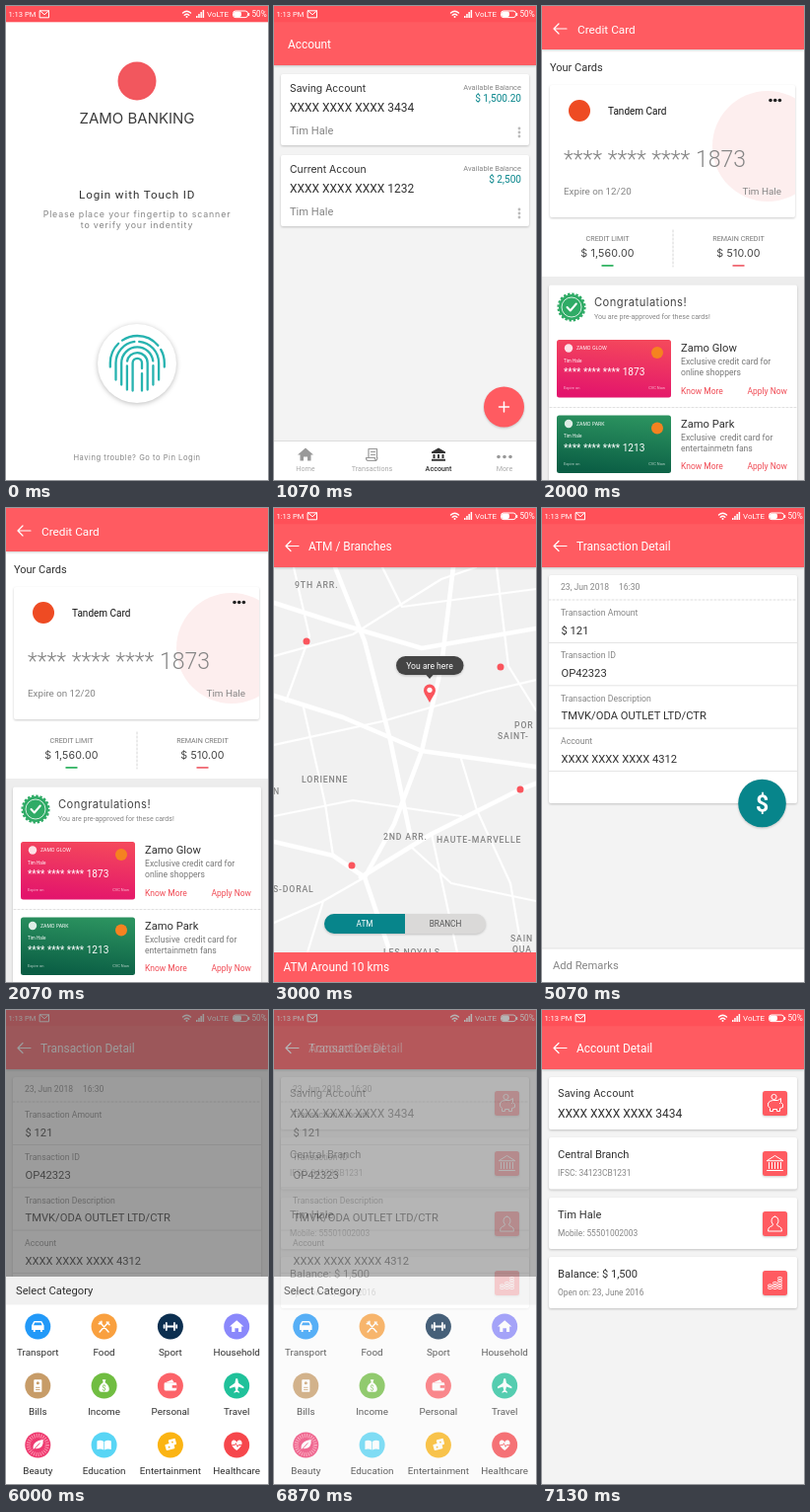
An HTML page that plays this animation: 266x480 px, repeating every 8000 ms.

```html
<!DOCTYPE html>
<html lang="en">
<head>
<meta charset="utf-8">
<title>Banking app screens</title>
<style>
html, body { margin: 0; width: 100%; height: 100%; overflow: hidden; background: #fff; }
svg { display: block; width: 100vw; height: 100vh; font-family: Roboto, sans-serif; }
text { white-space: pre; }
.wide { font-family: Inter, sans-serif; }
.lift { filter: drop-shadow(0 1px 1.3px #0003); }
.line { fill: none; stroke-linecap: round; stroke-linejoin: round; }
</style>
</head>
<body>
<svg id="stage" viewBox="0 0 266 480" preserveAspectRatio="none"></svg>
<script>
const RED = '#ff5b61', TEAL = '#07858b', INK = '#303030', GREY = '#858585', PAGE = '#f3f3f3';
const OWNER = 'Tim Hale', BANK = 'Zamo', CARD = 'Tandem Card', SHOP = 'TMVK/ODA OUTLET LTD/CTR';

const text = (x, y, size, str, fill = INK, more = '') =>
  `<text x="${x}" y="${y}" font-size="${size}" fill="${fill}" ${more}>${str}</text>`;
const rect = (x, y, w, h, fill, rx = 0, more = '') =>
  `<rect x="${x}" y="${y}" width="${w}" height="${h}" rx="${rx}" fill="${fill}" ${more}/>`;
const disc = (x, y, r, fill, more = '') => `<circle cx="${x}" cy="${y}" r="${r}" fill="${fill}" ${more}/>`;
const line = (d, stroke = '#fff', width = 1.3, more = '') =>
  `<path class="line" d="${d}" stroke="${stroke}" stroke-width="${width}" ${more}/>`;
const shape = (d, fill = '#fff', more = '') => `<path d="${d}" fill="${fill}" ${more}/>`;
const at = (x, y, body, scale = 1) => `<g transform="translate(${x} ${y}) scale(${scale})">${body}</g>`;
const MID = 'text-anchor="middle"', END = 'text-anchor="end"', WIDE = 'class="wide"', LIFT = 'class="lift"';
const spaced = gap => `letter-spacing="${gap}"`;
const panel = (x, y, w, h) => rect(x, y, w, h, '#fff', 2, LIFT);

const statusBar = () => rect(0, 0, 266, 16.3, '#ff5058') +
  text(2.5, 11.2, 7.6, '1:13 PM', '#fff') +
  line('M34.5 4.8h9v7h-9zl4.5 4 4.5-4', '#fff', 1) +
  line('M179.5 7q4-3.4 8 0M181.2 9.2q2.3-2 4.6 0', '#fff', 1.4) + disc(183.5, 11, 1, '#fff') +
  [0, 1, 2, 3].map(i => rect(193 + i * 2.2, 10 - i * 2, 1.5, 2 + i * 2, '#fff')).join('') +
  text(204, 11.2, 8, 'VoLTE', '#fff') +
  rect(230.5, 5, 15, 6.6, 'none', 2.5, 'stroke="#fff"') + rect(231, 5.5, 8, 5.6, '#fff', 2) + rect(246, 7, 1.2, 3, '#fff') +
  text(249.5, 11.2, 8.2, '50%', '#fff');

const arrow = y => line(`M25 ${y}h-13m5-5l-5 5 5 5`, '#fff', 1.2);
const header = (title, back = true) => rect(0, 0, 266, 60, RED, 0, LIFT) + statusBar() +
  (back ? arrow(38.5) : '') + text(back ? 35 : 14, 42.8, 11.9, title, '#fff');

// Small pictograms, each drawn around 0,0
const icon = {
  house: c => shape('M0-7L8 0H5.5V6H2V2h-4v4h-3.5V0H-8z', c),
  bank: c => shape('M0-7L7-3v1.5H-7V-3zM-5.5-.5h2v4h-2zm4.5 0h2v4h-2zm4.5 0h2v4h-2zM-7 4.3H7v2H-7z', c),
  receipt: c => line('M-3.5-6H5V3M-3.5-6V3M-6 3H3v1.5q2 2.5 2.5-1.5M-6 3q0 3 2 3H4M-1-3h4M-1 0h4', c, 1.2)
};

function login() {
  const arch = (r, foot, dash) =>
    line(`M${-r} ${foot}V0A${r} ${r} 0 0 1 ${r} 0V${foot}`, '#27b3b0', 2.3, `stroke-dasharray="${dash}"`);
  return rect(0, 0, 266, 480, '#fff') + statusBar() +
    disc(133, 76, 19.5, '#f2575e') +
    text(133, 118.5, 15, BANK.toUpperCase() + ' BANKING', '#3c3c3c', `${MID} ${WIDE}`) +
    text(74, 195, 11.6, 'Login with Touch ID', INK, spaced(.9)) +
    ['Please place your fingertip to scanner', 'to verify your indentity'].map((s, i) =>
      text(133, 213.5 + i * 11, 8.9, s, GREY, `${MID} ${WIDE} ${spaced(.83)}`)).join('') +
    disc(133, 362, 40, '#fff', 'style="filter:drop-shadow(0 1px 2.5px #0004)"') +
    at(133.3, 361.5,
      arch(27.5, 4, '26 5 40 5 30') + arch(21.8, 17, '48 5 80') + arch(16.1, 22, '70 5 60') +
      arch(10.4, 27, '24 5 90') + arch(4.7, 28, '48 5 40')) +
    text(133, 459.5, 7.6, 'Having trouble? Go to Pin Login', GREY, `${MID} ${WIDE} ${spaced(.52)}`);
}

function accounts() {
  const account = (y, name, no, sum) => panel(7, y, 252, 72) +
    text(16, y + 18, 10.4, name, INK, WIDE) + text(16, y + 38.3, 12, 'XXXX XXXX XXXX ' + no) +
    text(16, y + 61, 11.1, OWNER, GREY) +
    text(251, y + 15.5, 7.5, 'Available Balance', GREY, END) + text(251, y + 28, 10.1, sum, TEAL, END) +
    [55, 59, 63].map(d => disc(249, y + d, 1.4, '#bbb')).join('');
  const tab = (x, name, draw, on) => at(x, 454.5, draw) +
    text(x, 471, 7.2, name, on ? INK : '#aaa', MID + (on ? ' font-weight="500"' : ''));
  return rect(0, 0, 266, 480, PAGE) + header('Account', false) +
    account(69, 'Saving Account', '3434', '$ 1,500.20') + account(151, 'Current Accoun', '1232', '$ 2,500') +
    disc(233.5, 406, 20.5, RED, LIFT) + line('M228.5 406h10m-5-5v10', '#fff', 1.5) +
    rect(0, 440, 266, 40, '#fff') + rect(0, 440, 266, 1, '#ddd') +
    tab(32, 'Home', icon.house('#999')) + tab(99.5, 'Transactions', icon.receipt('#999')) +
    tab(167, 'Account', icon.bank('#333'), true) +
    tab(234, 'More', [-6, 0, 6].map(x => disc(x, 2, 1.8, '#999')).join(''));
}

function cards() {
  const fade = (id, top, bottom) => `<linearGradient id="${id}" x1=".6" y1="0" x2=".4" y2="1">` +
    `<stop stop-color="${top}"/><stop offset="1" stop-color="${bottom}"/></linearGradient>`;
  const limit = (x, name, sum, color) => text(x, 238.2, 7.2, name, '#777', MID) +
    text(x, 254, 10.7, sum, '#444', `${MID} ${WIDE} ${spaced(.15)}`) + rect(x - 6, 262, 12, 1.8, color);
  const offer = (y, name, no, fill, lines) => rect(15, y, 116, 58.5, fill, 2.5) +
    disc(27, y + 8.5, 4.2, '#fff', 'opacity=".85"') + disc(117, y + 13, 6, '#f58220') +
    text(35, y + 10.3, 4.9, `${BANK} ${name}`.toUpperCase(), '#fff', WIDE) +
    text(22, y + 22.5, 4.6, OWNER, '#fff') + text(22, y + 36, 10.1, '**** **** **** ' + no, '#fff') +
    text(22, y + 50, 4, 'Expire on', '#fff', 'opacity=".7"') + text(125, y + 50, 4, 'CVC Now', '#fff', END + ' opacity=".7"') +
    text(141, y + 12, 11.2, `${BANK} ${name}`) +
    lines.map((s, i) => text(141, y + 25 + i * 11, 8.6, s, '#777')).join('') +
    text(141, y + 54.5, 8.5, 'Know More', '#f04b55') + text(249, y + 54.5, 8.5, 'Apply Now', '#f04b55', END);
  return rect(0, 0, 266, 480, '#ededed') + rect(0, 44, 266, 230, '#fff') +
    rect(0, 0, 266, 44, RED, 0, LIFT) + arrow(23) + text(36, 27.5, 11.8, 'Credit Card', '#fff') +
    text(8, 66, 11, 'Your Cards') + panel(8, 80, 249, 134) +
    '<clipPath id="inCard"><path d="M8 80h249v134H8z"/></clipPath>' +
    disc(229, 142, 56, '#fdeeee', 'clip-path="url(#inCard)"') +
    disc(38, 106, 11, '#ee4b23') + text(67, 109.5, 10, CARD, '#111') +
    [232, 236.7, 241.4].map(x => disc(x, 95.5, 1.8, '#222')).join('') +
    text(22, 162.5, 23, '**** **** **** 1873', '#858585', 'font-weight="300"') +
    text(22, 191, 9.8, 'Expire on 12/20', GREY) + text(243, 191, 9.9, OWNER, GREY, END) +
    limit(66.5, 'CREDIT LIMIT', '$ 1,560.00', '#35b565') + limit(199.5, 'REMAIN CREDIT', '$ 510.00', '#f06a74') +
    line('M133 227V264', '#ccc', .8, 'stroke-dasharray="2 2"') +
    panel(7, 282.5, 252, 205) +
    disc(30, 305, 13, '#2fab66') + disc(30, 305, 13.4, 'none', 'stroke="#2fab66" stroke-width="2.4" stroke-dasharray="2.4 1.8"') +
    disc(30, 305, 10, 'none', 'stroke="#fff" stroke-width=".8"') + line('M25.5 305l3.3 3.5 6-7', '#fff', 2) +
    text(53, 304, 11.2, 'Congratulations!', '#444', `${WIDE} ${spaced(.45)}`) +
    text(53, 316.5, 7.1, 'You are pre-approved for these cards!', GREY) +
    line('M8 406.5H258', '#ddd', .9, 'stroke-dasharray="2 2"') +
    fade('pink', '#f4475c', '#e3146c') + fade('green', '#2b925f', '#0a5d44') +
    offer(338, 'Glow', '1873', 'url(#pink)', ['Exclusive credit card for', 'online shoppers']) +
    offer(414.5, 'Park', '1213', 'url(#green)', ['Exclusive  credit card for', 'entertainmetn fans']);
}

function branches() {
  const main = ['M0 190L70 212 150 246 266 262', 'M0 96L62 116 150 142 266 122', 'M62 60L92 135 118 235 138 330',
    'M88 374L160 330 250 285 266 279', 'M0 338L60 352 92 374 118 450', 'M182 60L170 160 150 246 122 320 92 374'];
  const side = ['M0 150L80 128 170 72 205 60', 'M20 60L36 130 12 196', 'M226 60L238 160 266 205', 'M0 240L110 216 215 186 266 174',
    'M30 202L52 300 60 352', 'M0 312L80 296 190 312', 'M190 254L206 306 240 380 252 450', 'M138 342L180 380 266 398',
    'M0 420L50 398 92 374M34 450L50 398', 'M160 330L186 450', 'M110 60L130 100 266 82'];
  const place = (x, y, s) => text(x, y, 8.7, s, '#858585', `font-weight="500" ${spaced(.85)}`);
  return rect(0, 0, 266, 480, '#f1f1f1') +
    main.map(d => line(d, '#fff', 4.6)).join('') + side.map(d => line(d, '#fff', 2.2)).join('') +
    [[21, 81, '9TH ARR.'], [244, 223, 'POR'], [227, 234, 'SAINT-'], [28, 277.5, 'LORIENNE'], [-1, 289.5, 'N'],
      [111, 336, '2ND ARR.'], [165, 339, 'HAUTE-MARVELLE'], [-1, 388.5, 'S-DORAL'], [111, 452.5, 'LES NOYALS'],
      [240, 438.5, 'SAIN'], [242, 450, 'QUA']].map(p => place(...p)).join('') +
    [[33, 135], [230, 161], [250, 285], [79, 362]].map(([x, y]) => disc(x, y, 3.5, '#fa555d')).join('') +
    rect(124, 150, 68.5, 19, '#454545', 9.5, LIFT) + shape('M154 168.5h8l-4 4.5z', '#454545') +
    text(158, 162.6, 8.6, 'You are here', '#fff', MID) +
    shape('M158 197C155 191 152 188 152 184.5a6 6 0 0 1 12 0C164 188 161 191 158 197z', '#fa555d') + disc(158, 184.3, 2.6, '#fff') +
    rect(51, 411, 164, 20, '#dad9d8', 10, LIFT) + shape('M133 411H61a10 10 0 0 0 0 20h72z', TEAL) +
    text(92, 424.2, 8.2, 'ATM', '#fff', MID) + text(174, 424.2, 8.2, 'BRANCH', '#555', MID) +
    header('ATM / Branches') + rect(0, 450, 266, 30, RED) + text(9.5, 469.3, 11.9, 'ATM Around 10 kms', '#fff');
}

function transactions() {
  return rect(0, 0, 266, 480, '#fff') + header('Transactions') +
    text(19, 83, 8.6, '23, Jun 2018', GREY) + text(19, 101, 11, SHOP) +
    text(247, 83, 11.2, '$ 121', INK, END) + rect(7, 112, 252, 1, '#e4e4e4');
}

function detail() {
  const rows = [['Transaction Amount', '$ 121'], ['Transaction ID', 'OP42323'],
    ['Transaction Description', SHOP], ['Account', 'XXXX XXXX XXXX 4312']];
  return rect(0, 0, 266, 480, PAGE) + header('Transaction Detail') + panel(7, 68, 252, 231) +
    text(19, 83, 8.6, '23, Jun 2018', GREY) + text(78, 83, 8.6, '16:30', GREY) +
    line('M7 93H259', '#ddd', 1, 'stroke-dasharray="2 2"') +
    rows.map(([name, value], i) => text(19, 109 + i * 43.4, 8.7, name, GREY) +
      text(19.5, 127.5 + i * 43.4, 11.2, value) + rect(7, 136 + i * 43.3, 252, 1, '#e4e4e4')).join('') +
    disc(223.5, 299, 24.3, TEAL, LIFT) + text(223.5, 307, 23, '$', '#fff', MID + ' font-weight="700"') +
    rect(0, 446, 266, 34, '#fff') + rect(0, 445.5, 266, 1, '#e2e2e2') + text(11, 467, 11.2, 'Add Remarks', GREY);
}

function sheet() {
  const heart = 'M0 6C-9 0-6-6-3-5.500Q-1-5.500 0-3Q1-5.500 3-5.500C6-6 9 0 0 6z';
  const items = [
    ['Transport', '#2299f8', shape('M-7-1l2-4q.5-1 1.500-1h7q1 0 1.500 1l2 4v5H5v2H3V4h-6v2h-2V4h-2zM-4.800-1.500h9.600l-1.300-3h-7z', '#fff', 'fill-rule="evenodd"')],
    ['Food', '#f9a03f', line('M-5-5L5 6M5-5L-5 6M-6-3l3 0 0-3M3-5l3 3', '#fff', 1.6)],
    ['Sport', '#0c2f50', line('M-7-1.500v3M-4.500-4v8M4.500-4v8M7-1.500v3M-4 0h8', '#fff', 2)],
    ['Household', '#8a88fb', icon.house('#fff')],
    ['Bills', '#c79c68', rect(-4.5, -7, 9, 14, '#fff', 1) + disc(0, -3, 1.7, '#c79c68') + line('M-2 2h4M-2 4.500h4', '#c79c68', 1)],
    ['Income', '#70bd41', shape('M-2-7h4L1-4C7 0 7 7 3 7h-6C-7 7-7 0-1-4z') + text(0, 4.7, 8, '$', '#70bd41', MID)],
    ['Personal', '#fc6369', rect(-7, -3.5, 14, 9, '#fff', 1.5) + shape('M-5-4l7-3 2 3z') + rect(2, -.5, 5, 3, '#fc6369')],
    ['Travel', '#20c19a', shape('M-1-8h2l1 5 6 4v2L2 1 1 5l2 2v1l-3-1-3 1V7l2-2-1-4-6 2V1l6-4z')],
    ['Beauty', '#ee3a70', disc(0, 0, 10.5, 'none', 'stroke="#ff9bb4" stroke-width="4.500" stroke-dasharray="1 1.500"') + shape('M-5 5Q-7-4 6-6 7 5-3 4z') + line('M-6 7L2-2', '#ee3a70', 1)],
    ['Education', '#58d5f5', shape('M-.4-4Q-4-6-8-4.500V5Q-4 3.500-.4 5.500zM.4-4Q4-6 8-4.500V5Q4 3.500.4 5.500z')],
    ['Entertainment', '#fbb413', `<g transform="rotate(-15)">${rect(-6, -2, 10, 7, '#fff', 1) + rect(-1, -6, 8, 7, '#fff', 1) + disc(-2, 2, 1, '#fbb413') + disc(3, -2.5, 1, '#fbb413')}</g>`],
    ['Healthcare', '#f6474c', shape(heart) + line('M-5 0h3l1-2 2 4 1-2h3', '#f6474c', 1)]
  ];
  return detail() + rect(0, 0, 266, 480, '#555', 0, 'opacity=".58"') +
    rect(0, 270, 266, 210, '#fff') + rect(0, 270, 266, 28.5, '#f1f1f1') + text(10, 288.3, 11.2, 'Select Category') +
    items.map(([name, color, draw], i) => {
      const x = 32.3 + i % 4 * 67.3, y = 320.5 + Math.floor(i / 4) * 60;
      return disc(x, y, 13, color) + at(x, y, draw, .9) + text(x, y + 29.5, 9.9, name, INK, MID);
    }).join('');
}

function accountDetail() {
  const row = (y, h, top, sub, draw) => panel(7, y, 252, h) + top + sub +
    rect(224, y + 14, 25, 25, RED, 2.5, LIFT) + at(236.5, y + 26.5, draw);
  const pair = (y, a, b) => [text(16, y + 21.3, 11.1, a), text(16, y + 39, 8.4, b, GREY)];
  const thin = d => line(d, '#fff', 1);
  const coins = [[-5, 2], [0, 3], [5, 5]].map(([x, n]) =>
    Array.from({ length: n }, (_, i) => rect(x - 2, 4 - i * 2.5, 4, 2, 'none', 1, 'stroke="#fff" stroke-width=".9"')).join('')).join('');
  return rect(0, 0, 266, 480, PAGE) + header('Account Detail') +
    row(68, 53, text(16, 87.5, 10.4, 'Saving Account', INK, WIDE), text(16, 108.8, 12, 'XXXX XXXX XXXX 3434'),
      thin('M-7 0Q-6-3-2-3H3l3-2v4l2 2v3L5 5v3H2V6h-4v2h-3V5Q-8 3-7 0M5 0h.1') + disc(-1, -6.5, 2.6, 'none', 'stroke="#fff"')) +
    row(129, 52.5, ...pair(129, 'Central Branch', 'IFSC: 34123CB1231'),
      thin('M-8-3L0-8 8-3zM-6-1v6M-3-1v6M0-1v6M3-1v6M6-1v6M-8 7H8')) +
    row(190, 52, ...pair(190, OWNER, 'Mobile: 55501002003'),
      thin('M0-7.500a4 4.500 0 0 1 2 8q0 2 3 2.500 2 1 2 4.500H-7q0-3.500 2-4.500 3-.5 3-2.500a4 4.500 0 0 1 2-8')) +
    row(250, 52, ...pair(250, 'Balance: $ 1,500', 'Open on: 23, June 2016'), coins);
}

// Each screen covers the ones before it: [draw, [time, opacity], ...]
const LOOP = 8000;
const screens = [
  [login, [0, 1]], [accounts, [1000, 1]], [cards, [2000, 1]], [branches, [3000, 1]],
  [transactions, [4000, 1]], [detail, [5000, 1]], [sheet, [6000, 1]],
  [accountDetail, [6870, .25], [6957, .5], [7043, .75], [7130, 1]]
];
const stage = document.getElementById('stage');
stage.innerHTML = screens.map(([draw]) => `<g opacity="0">${draw()}</g>`).join('');
const layers = [...stage.children];

function show(now) {
  const t = now % LOOP;
  screens.forEach(([, ...steps], i) => {
    const step = steps.filter(([start]) => start <= t).pop();
    layers[i].setAttribute('opacity', step ? step[1] : 0);
  });
}
const begin = performance.now();
function tick() {
  show(performance.now() - begin);
  requestAnimationFrame(tick);
}
tick();
</script>
</body>
</html>
```
